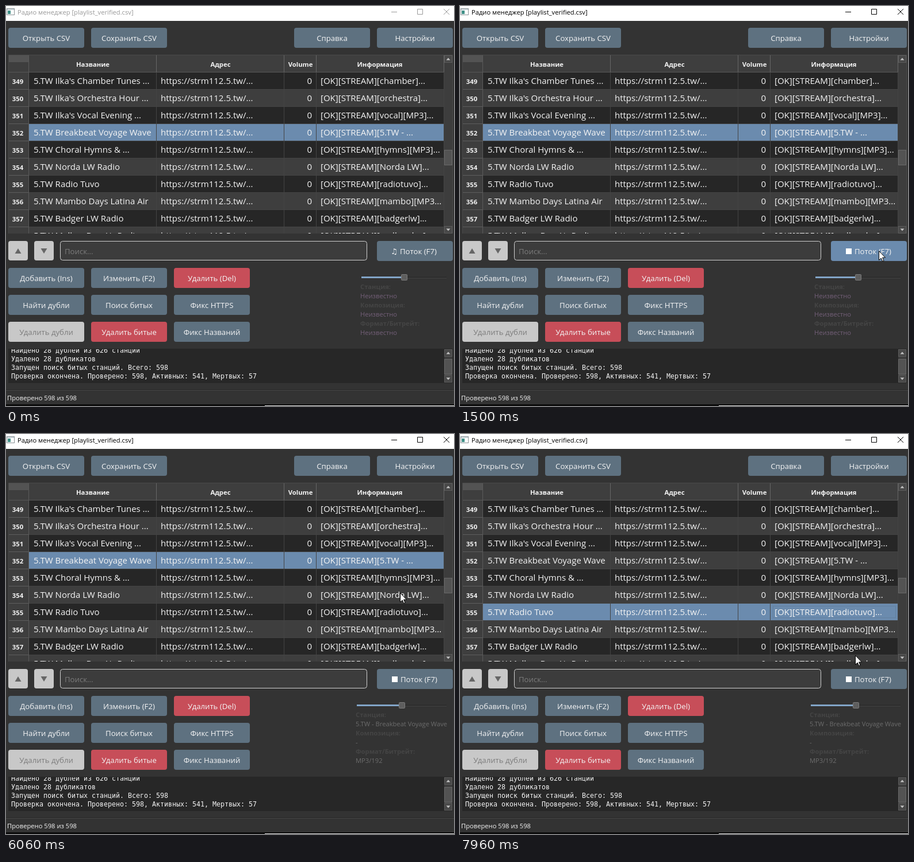
These frames come from a looping animation (779x698 px, 8000 ms). An HTML page:

```html
<!DOCTYPE html>
<html lang="ru">
<head>
<meta charset="utf-8">
<title>Радио менеджер</title>
<style>
html, body { margin: 0; width: 100%; height: 100%; overflow: hidden; background: #333; }
svg { display: block; width: 779px; height: 698px; }
text { font: 13.2px "Open Sans", "Noto Sans", sans-serif; fill: #f4f4f4; white-space: pre; }
.mid { text-anchor: middle; }
.end { text-anchor: end; }
.cell { font-size: 15px; }
.small { font-size: 11.2px; }
.head { font-size: 11.3px; font-weight: 700; }
.log { font: 11.63px "DejaVu Sans Mono", monospace; }
.label { font-size: 11.2px; font-weight: 700; fill: #454545; }
.off { fill: #7c7c7c; }
.note { font-family: "DejaVu Sans", sans-serif; }
#idle .small { fill: #735f78; }
#live .small { fill: #6c6c6c; }
</style>
</head>
<body>
<svg id="stage" viewBox="0 0 779 698"></svg>
<script>
const BLUE = '#5e7180', HOVER = '#6b8bae', RED = '#c74e59', GREY = '#c8c8c8', GRID = '#444';
const ROW = 30, TOP = 116;
const rect = (x, y, w, h, fill, more = '') =>
  `<rect x="${x}" y="${y}" width="${w}" height="${h}" fill="${fill}" ${more}/>`;
const text = (x, y, s, cls = '') =>
  `<text x="${x}" y="${y}" class="${cls}">${s.replace(/&/g, '&amp;')}</text>`;
const path = (d, more) => `<path d="${d}" ${more}/>`;
const group = (id, body) => `<g id="${id}">${body}</g>`;
const button = (x, y, label, fill = BLUE, cls = '') =>
  rect(x, y, 132, 35, fill, 'rx="4"') + text(x + 66, y + 23, label, 'mid ' + cls);

function titleBar() {
  return rect(0, 0, 779, 26, '#fff') +
    rect(1.5, 4.5, 13, 11, '#fff', 'stroke="#8a9296"') + rect(2, 5, 12, 2, '#c9d3d8') +
    rect(3, 8, 5, 6, '#3f8f86') +
    group('title', text(20, 15, 'Радио менеджер [playlist_verified.csv]', 'small') +
      path('M670 10.5h10M715.5 5.5h9v9h-9zM761 5l10 10M771 5l-10 10', 'fill="none"'));
}

function scrollBar(y, h, thumbY, thumbH) {
  const arrow = (ay, s) => rect(762.5, ay + .5, 13, 12, '#484848', 'stroke="#5c5c5c"') +
    path(`M765.5 ${ay + 6.5 + 2 * s}h7l-3.5 ${-4 * s}z`, 'fill="#c4c4c4"');
  return rect(762, y, 14, h, '#3d3d3d') + arrow(y, 1) + arrow(y + h - 13, -1) +
    rect(762.5, thumbY + .5, 13, thumbH - 1, '#535353', 'stroke="#696969"');
}

const stations = [
  ["Ilka's Chamber Tunes ...", 'chamber]...'],
  ["Ilka's Orchestra Hour ...", 'orchestra]...'],
  ["Ilka's Vocal Evening ...", 'vocal][MP3]...'],
  ['Breakbeat Voyage Wave', '5.TW - ...'],
  ['Choral Hymns & ...', 'hymns][MP3]...'],
  ['Norda LW Radio', 'Norda LW]...'],
  ['Radio Tuvo', 'radiotuvo]...'],
  ['Mambo Days Latina Air', 'mambo][MP3...'],
  ['Badger LW Radio', 'badgerlw]...'],
  ['Mellow Day Air Radio', 'mellowday]...']
];

function table() {
  const bands = stations.map((_, i) =>
    rect(40, TOP + i * ROW, 722, ROW, i % 2 ? '#3e3e3e' : '#262626')).join('');
  const cells = stations.map(([name, info], i) => {
    const y = TOP + i * ROW, base = y + 20;
    return rect(40, y + 29, 722, 1, GRID) +
      rect(5, y, 35, ROW, '#3e3e3e') + rect(5, y - 1, 35, 1, '#5e5e5e') +
      text(20.5, base, String(349 + i), 'head mid') +
      text(48, base, '5.TW ' + name, 'cell') +
      text(269, base, 'https://strm112.5.tw/...', 'cell') +
      text(532, base, '0', 'cell end') +
      text(547, base, '[OK][STREAM][' + info, 'cell');
  }).join('');
  const lines = [261, 483, 539, 761].map(x =>
    rect(x, 86, 1, 30, '#666') + rect(x, TOP, 1, 281, GRID)).join('');
  const heads = [[151, 'Название'], [373, 'Адрес'], [512, 'Volume'], [650, 'Информация']]
    .map(([x, s]) => text(x, 106, s, 'head mid')).join('');
  const sel = group('sel', rect(40, 206, 722, 29, HOVER));
  const focus = group('focus', rect(544.5, 300.5, 213, 20, 'none',
    'stroke="#5b7694" stroke-dasharray="1 1"'));
  return `<g clip-path="url(#tableClip)">` + rect(4, 85, 773, 312, '#3e3e3e') + bands + sel + lines +
    cells + focus + rect(5, 86, 35, 12, '#535353') + rect(39, 86, 1, 311, '#5a5a5a') +
    rect(5, 115, 757, 1, '#585858') + heads + scrollBar(86, 311, 251, 27) + '</g>' +
    path('M4.5 397V85.5H776.5V397', 'fill="none" stroke="#4a4a4a"');
}

function searchRow() {
  const arrow = (x, s) => rect(x, 410, 34, 34, GREY, 'rx="4"') +
    path(`M${x + 11.5} ${427.5 + 4.5 * s}h11l-5.5 ${-9 * s}z`, 'fill="#666"');
  return arrow(4, 1) + arrow(49, -1) +
    rect(94.5, 410.5, 533, 33, '#3c3c3c', 'rx="4" stroke="#d0d0d0"') +
    text(102, 433, 'Поиск...', 'off') +
    rect(645, 410, 132, 35, BLUE, 'rx="4" id="stream"') +
    group('play', text(669, 433, '♫', 'note') + text(685, 433, 'Поток (F7)')) +
    group('stop', rect(671, 423, 10, 10, '#fff') + text(686, 433, 'Поток (F7)'));
}

function infoPanel(id, x, handle, values) {
  const labels = ['Станция:', 'Композиция:', 'Формат/Битрейт:'], left = x + 2;
  return group(id, rect(left, 473, 766 - left, 1, '#202020') + rect(left, 474, 766 - left, 1, '#484848') +
    rect(left, 472, handle - left, 3, '#82a5c8') +
    rect(handle + .5, 468.5, 10, 10, '#5e5e5e', 'rx="1" stroke="#7c7c7c"') +
    labels.map((s, i) => text(x, 494 + 32 * i, s, 'label') +
      text(x, 510 + 32 * i, values[i], 'small')).join(''));
}

function logBox() {
  const lines = ['Найдено 28 дублей из 626 станций', 'Удалено 28 дубликатов',
    'Запущен поиск битых станций. Всего: 598',
    'Проверка окончена. Проверено: 598, Активных: 541, Мертвых: 57'];
  return rect(4, 598, 773, 60, '#272727') + '<g clip-path="url(#logClip)">' +
    lines.map((s, i) => text(9, 605 + 15 * i, s, 'log')).join('') + '</g>' +
    scrollBar(599, 58, 616, 27);
}

const stage = document.getElementById('stage');
stage.innerHTML = `<defs>
  <clipPath id="tableClip">${rect(4, 85, 773, 312, '#000')}</clipPath>
  <clipPath id="logClip">${rect(4, 599, 758, 58, '#000')}</clipPath></defs>` +
  rect(0, 0, 779, 698, '#333') + titleBar() +
  button(4, 38, 'Открыть CSV') + button(148, 38, 'Сохранить CSV') +
  button(501, 38, 'Справка') + button(645, 38, 'Настройки') +
  table() + searchRow() +
  button(4, 457, 'Добавить (Ins)') + button(148, 457, 'Изменить (F2)') +
  button(292, 457, 'Удалить (Del)', RED) +
  button(4, 504, 'Найти дубли') + button(148, 504, 'Поиск битых') + button(292, 504, 'Фикс HTTPS') +
  button(4, 551, 'Удалить дубли', GREY, 'off') + button(148, 551, 'Удалить битые', RED) +
  button(292, 551, 'Фикс Названий') +
  infoPanel('idle', 616, 687, ['Неизвестно', 'Неизвестно', 'Неизвестно']) +
  infoPanel('live', 608, 683, ['5.TW - Breakbeat Voyage Wave', '-', 'MP3/192']) +
  logBox() +
  rect(0, 669, 779, 1, '#252525') + rect(0, 670, 779, 1, '#484848') +
  text(2, 688, 'Проверено 598 из 598', 'small') +
  rect(0, 695, 779, 3, '#0c0c0c') + rect(450, 697, 329, 1, '#f0f0f0') +
  group('cursor', group('ring',
    '<circle cx="1.5" cy="1.5" r="9.5" fill="none" stroke="#111" stroke-width="2"/>' +
    '<circle cx="1.5" cy="1.5" r="8.5" fill="none" stroke="#fff" stroke-width="1.3"/>') +
    path('M.5 .5V16.5L4.2 13L6.7 18.5L9 17.5L6.6 12H11.5Z', 'fill="#fff" stroke="#000"'));

const el = id => document.getElementById(id);
const show = (id, on) => el(id).style.display = on ? '' : 'none';

// time, x, y, number of discrete steps taken to get there
const track = [
  [620, 770, 432, 1], [920, 728, 427, 5],
  [5550, 728, 427, 1], [5610, 723, 423, 1], [6060, 685, 277, 8], [6120, 682, 277, 1],
  [6225, 682, 277, 1], [6360, 670, 290, 3],
  [6830, 670, 290, 1], [7280, 660, 309, 7],
  [7668, 660, 309, 1], [7960, 687, 386, 7]
];

function pointer(t) {
  const i = track.findIndex(k => k[0] > t);
  if (i < 0) return track[track.length - 1].slice(1, 3);
  if (i === 0) return track[0].slice(1, 3);
  const [t0, x0, y0] = track[i - 1], [t1, x1, y1, n] = track[i];
  const k = Math.floor((t - t0) / (t1 - t0) * n + 1e-6) / n;
  const e = k * k * (3 - 2 * k);
  return [Math.round(x0 + (x1 - x0) * e), Math.round(y0 + (y1 - y0) * e)];
}

function draw() {
  const t = performance.now() % 8000, [x, y] = pointer(t);
  const visible = t >= 620, picked = t >= 7340, ink = t >= 1350 ? '#000' : '#999';
  const over = visible && x >= 645 && x < 777 && y >= 410 && y < 445;
  show('cursor', visible);
  el('cursor').setAttribute('transform', `translate(${x} ${y})`);
  show('ring', t >= 1320 && t < 1500 || t >= 7280 && t < 7520);
  el('stream').setAttribute('fill', over ? HOVER : BLUE);
  el('title').querySelector('text').style.fill = ink;
  el('title').querySelector('path').setAttribute('stroke', ink);
  show('play', t < 1500);
  show('stop', t >= 1500);
  show('idle', t < 3210);
  show('live', t >= 3210);
  el('sel').setAttribute('transform', `translate(0 ${picked ? 3 * ROW : 0})`);
  show('focus', picked);
  requestAnimationFrame(draw);
}
draw();
</script>
</body>
</html>
```
